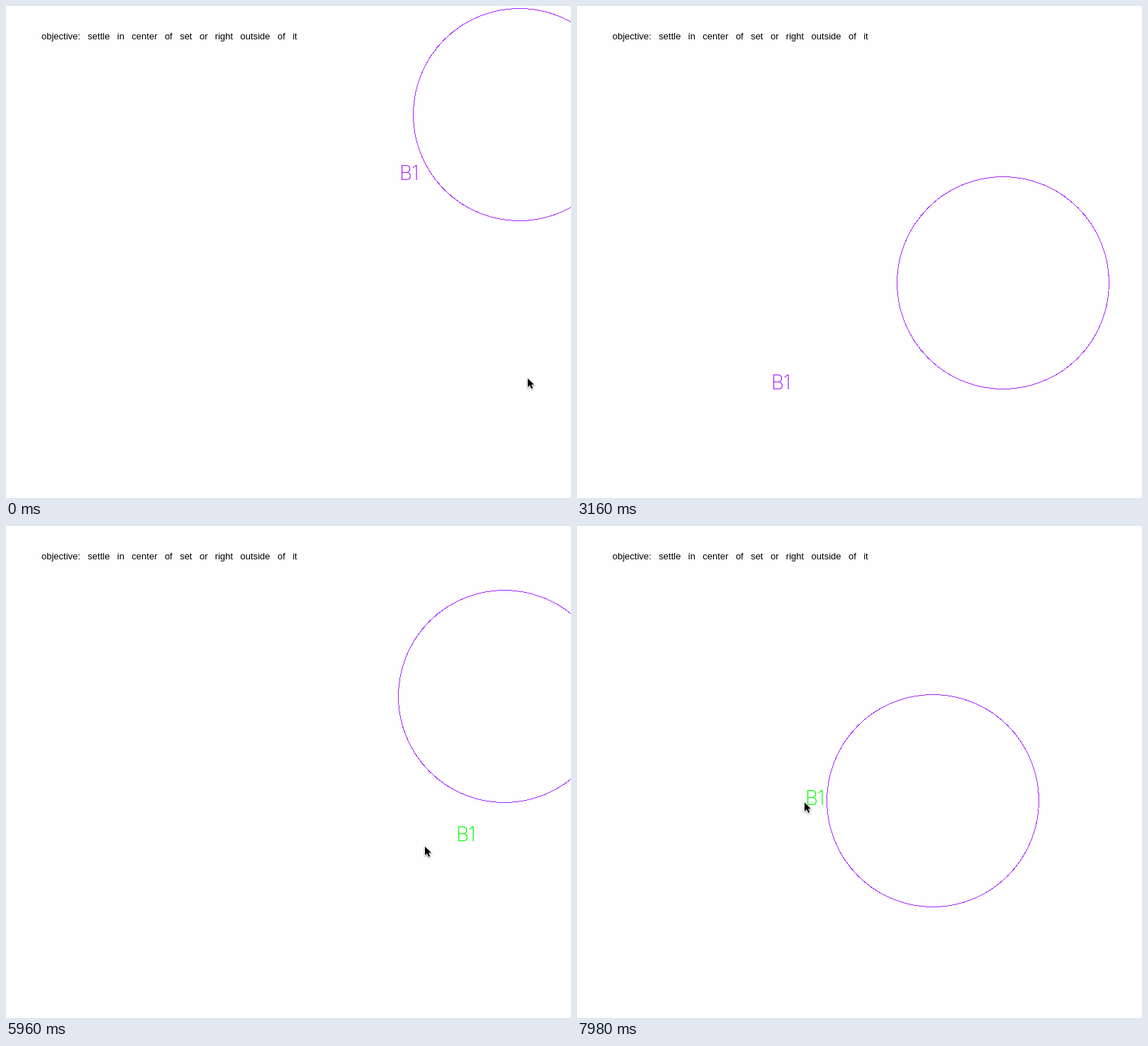
Animation, 797 px wide and 693 px high, one loop 8 s. Source, as an HTML page:

```html
<!DOCTYPE html>
<html lang="en">
<head>
<meta charset="utf-8">
<title>Settle</title>
<style>
html, body { margin: 0; width: 100%; height: 100%; overflow: hidden; background: #fefefe; }
svg { display: block; width: 797px; height: 693px; }
.goal { font: 13px "Liberation Sans", Arial, sans-serif; word-spacing: 6.8px; }
.label { font: 200 28px Inter, Lato, sans-serif; letter-spacing: -1px; }
#ring { fill: none; stroke: #a626ff; shape-rendering: crispEdges; }
#pointer { filter: drop-shadow(0 1px 1px #0006); }
</style>
</head>
<body>
<svg viewBox="0 0 797 693">
  <text class="goal" x="50" y="47">objective: settle in center of set or right outside of it</text>
  <circle id="ring" r="149.5"/>
  <g id="tag"><text class="label" x="-2" y="20.5">B1</text></g>
  <path id="pointer" d="M1 1.5V13.8L4 11.2 6.2 16 8.2 15.2 6.2 10.3H10Z" stroke="#fff" stroke-width="1.6" paint-order="stroke"/>
</svg>
<script>
const LOOP = 8000;
const SPEED = 0.2; // px per ms on each axis

// Each scene drops ring and tag at new spots; both then drift to rest.
const scenes = [
  { at: 0, ring: [724, 153], tag: [557, 224] },
  { at: 450, ring: [642, 610], tag: [638, 375], rest: [[642, 586], [638, 399]] },
  { at: 1110, ring: [36, 530], tag: [271, 64], rest: [[139, 400], [168, 194]] },
  { at: 2200, ring: [700, 120], tag: [568, 235] },
  { at: 2950, ring: [643, 348], tag: [234, 561], rest: [[529, 443], [348, 466]] },
  { at: 4000, ring: [703, 166], tag: [736, 483], rest: [[703, 240], [736, 409]] },
  { at: 6530, ring: [614, 335], tag: [201, 455], rest: [[502, 387], [324, 372]] }
];

// The pointer sweeps between two spots; bend bows the path up or down.
const sweeps = [
  { at: 90, end: 180, from: [735, 523], to: [764, 530], bend: 0 },
  { at: 5150, end: 5600, from: [786, 474], to: [733, 430], bend: -85 },
  { at: 5780, end: 6550, from: [733, 430], to: [189, 458], bend: 17 },
  { at: 7350, end: 7980, from: [189, 458], to: [320, 388], bend: 0 }
];

const drag = { at: 5780, end: 6530, lag: 56, grip: [3, -21], pullAt: 6050, pull: [-0.169, 0.193] };

const [ring, tag, pointer] = ["ring", "tag", "pointer"].map(id => document.getElementById(id));
const within = (t, from, to) => t >= from && t < to;
const clamp = (v, lo, hi) => Math.max(lo, Math.min(hi, v));
const add = (a, b, k = 1) => a.map((v, i) => v + b[i] * k);
const approach = (from, to, step) => from.map((v, i) => v + clamp(to[i] - v, -step, step));
const current = (list, t) => list.findLast(item => item.at <= t) || list[0];

function pointerAt(t) {
  const { at, end, from, to, bend } = current(sweeps, t);
  const u = clamp((t - at) / (end - at), 0, 1);
  const p = 1 - (1 - u) ** 1.14;
  const [x, y] = from.map((v, i) => v + (to[i] - v) * p);
  return [x, y + bend * Math.sin(Math.PI * p)];
}

function pose(t) {
  const { at, ring, tag, rest = [ring, tag] } = current(scenes, t);
  const step = SPEED * (t - at);
  const spots = [approach(ring, rest[0], step), approach(tag, rest[1], step)];
  if (within(t, drag.at, drag.end)) {
    spots[0] = add(spots[0], drag.pull, Math.max(0, t - drag.pullAt));
    spots[1] = add(pointerAt(t - drag.lag), drag.grip);
  }
  return spots;
}

function place(el, spot) {
  el.setAttribute("transform", `translate(${spot.map(Math.round).join(" ")})`);
}

function draw() {
  const t = performance.now() % LOOP;
  const [ringSpot, tagSpot] = pose(t);
  place(ring, ringSpot);
  place(tag, tagSpot);
  place(pointer, pointerAt(t));
  const held = within(t, 5600, drag.end) || t >= 7900;
  tag.setAttribute("fill", held ? "#0f0" : "#a626ff");
  pointer.setAttribute("visibility", within(t, 450, 5150) ? "hidden" : "visible");
  requestAnimationFrame(draw);
}
draw();
</script>
</body>
</html>
```
